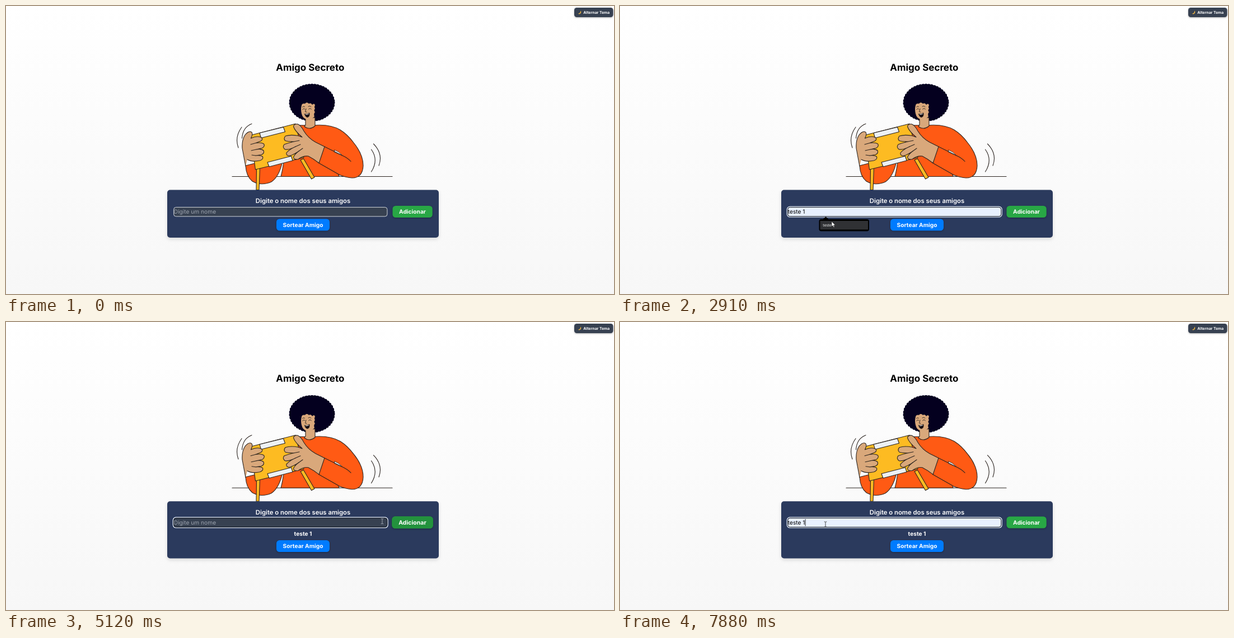
An HTML page that plays this animation: 1086x516 px, repeating every 8000 ms.

```html
<!DOCTYPE html>
<html lang="pt-BR">
<head>
<meta charset="utf-8">
<title>Amigo Secreto</title>
<style>
  html, body { margin: 0; width: 100%; height: 100%; overflow: hidden; background: #fff; }
  svg { display: block; width: 100vw; height: 100vh; }
  text { font: 10.18px Inter, sans-serif; font-optical-sizing: none; text-rendering: geometricPrecision; }
  .mid { text-anchor: middle; }
  .bold { font-weight: 700; fill: #fff; }
  .title { font-size: 16.97px; font-weight: 700; fill: #000; }
  .label { font-size: 11.31px; font-weight: 600; fill: #fff; }
  .tiny { font-size: 6.79px; }
  .tip { font-family: "Open Sans", "Noto Sans", sans-serif; font-size: 6.79px; fill: #fff; }
  .panel { filter: drop-shadow(0 3px 3px rgba(0, 0, 0, .12)); }
  .btn { filter: drop-shadow(0 1.5px 1.5px rgba(0, 0, 0, .3)); }
  .art { stroke: #2b2420; stroke-width: 1.1; stroke-linejoin: round; stroke-linecap: round; }
  .line { fill: none; }
  .skin { fill: #d9a87b; }
  .shirt { fill: #ff5a14; }
  .box { fill: #fdbb22; }
  .tape { fill: #edf1f4; }
  .hair { fill: #04001f; stroke: #04001f; stroke-width: 7; stroke-dasharray: 0 5; }
</style>
</head>
<body>
<svg viewBox="0 0 1086 516" preserveAspectRatio="none">
  <defs>
    <linearGradient id="bg" x2="0" y2="1">
      <stop offset="0" stop-color="#fff"/>
      <stop offset="1" stop-color="#f7f7f7"/>
    </linearGradient>
  </defs>
  <rect width="1086" height="516" fill="url(#bg)"/>

  <g class="btn">
    <rect x="1015" y="3" width="69.5" height="17" rx="4.5" fill="#374151"/>
    <path d="M1026 8.6A3.2 3.2 0 1 1 1021.6 13.4A4 4 0 0 0 1026 8.6Z" fill="#f5b942"/>
    <text class="bold tiny" x="1031.2" y="14">Alternar Tema</text>
  </g>

  <g id="top">
    <text class="title mid" x="543.4" y="115.8">Amigo Secreto</text>
    <g class="art">
      <path class="line" d="M404 305.5H690"/>
      <!-- motion marks -->
      <path class="line" d="M421 217Q408 235 415 254M439 211Q423 217 421.5 237M656.500 247Q674 265 666 286M652.500 257Q666 276 652.500 297"/>
      <!-- head -->
      <ellipse class="hair" cx="546.500" cy="173" rx="37.500" ry="30.300"/>
      <!-- torso and far arm -->
      <path class="shirt" d="M491 305.500Q495 290 496 277L520 213.500Q530 214 536 213.500H553Q580 212 597 222Q610 230 621 245Q638 266 638 286Q637 308 618 308Q606 307 594 302L595 305.500Z"/>
      <path class="skin" d="M535 200V213Q533 215 533 216Q542 223 552 215V200Z"/>
      <path class="skin" stroke="none" d="M528 178Q529 174 534 175Q537 171 541 175Q545 173 547 177Q551 173 552 178Q550 181 552 184Q549 187 552 190Q549 193 551 198Q545 204 538 203Q530 202 528 193Q526 185 528 178Z"/>
      <path class="line" stroke-width=".9" d="M529.500 181Q531 179 533.500 180.500M540 180Q543 178 545 180.500M529.500 185.500Q532 182.500 534 185M540.500 185Q543 182 545.500 185M536 184L534.500 189.500L537 190"/>
      <path fill="#160b10" stroke-width=".7" d="M533.500 193.500Q538 194 542 191.500Q543 199 538 199.500Q534.500 198.500 533.500 193.500Z"/>
      <path stroke="#fff" stroke-width="1" d="M535.500 194.300Q538 194.500 540.500 193.300" fill="none"/>
      <!-- near arm -->
      <path class="shirt" d="M428 286Q429 305 440 314Q456 323 474 315Q488 306 494 278L444 282Z"/>
      <!-- forearm -->
      <path class="tape" stroke-width=".8" d="M587 258Q594 260 601 268L587 262Z"/>
      <path class="line" d="M569 252L601 268Q610 272 616 278.500M559 281.500L594 301.500"/>
      <!-- parcel -->
      <path class="box" d="M447.500 292L453.500 290L452 329.500H447ZM526 276L531.500 273.500L551 307L545.500 310Z"/>
      <path class="box" d="M437 231.500L517 211L532 271.500L445.500 293Z"/>
      <path class="tape" d="M453 227.500L495.500 217L498.500 225.500L455.500 236.500ZM467 280L509.500 269L512 277L470 288Z"/>
      <!-- hands -->
      <path class="skin" d="M428 287L422 255Q421 240 427 231Q433 223.500 438 225.500Q442 228 437.500 237Q448 232 456 235.500Q460 239 455 242L446 245.500Q456 244 460.500 247Q463 251 458 254.500L447 257Q456 255 460 259Q462 264 456 266.500L446 268Q455 267 458.500 270Q460 275 453 277Q440 280 431 275"/>
      <path class="line" d="M446 245.500L437 248M447 257L438 259M446 268L439 267"/>
      <path class="skin" d="M569 252L559 281.500Q550 274 540 269Q530 268 522 274.500Q514 276 513.500 271Q515 266 523 260Q513 267 506 268.500Q500 268 501 263Q506 257 517 252Q506 258 498.500 257Q493 253 497 248Q506 245 514 243Q504 243 499 241.500Q495 238 499 233Q508 230 522 232.500L529 235Q516 224 513.500 216Q514 211 521 211.500Q527 214 532 224Q540 237 553 244Z"/>
      <path class="line" d="M514 243L524 241M517 252L526 248M523 260L530 255"/>
    </g>
  </g>

  <rect id="panel" class="panel" x="288" width="485" rx="5" fill="#2b3a5d"/>
  <text id="label" class="label mid" x="530.5" y="352.8">Digite o nome dos seus amigos</text>

  <g id="row">
    <rect id="ring" x="298.500" y="359.500" width="383.500" height="18.500" rx="5" fill="none" stroke="#eaf3ff" stroke-width="1.500"/>
    <rect id="field" x="299.600" y="360.600" width="381.300" height="16.400" rx="4"/>
    <text id="value" x="299.800" y="372.400"></text>
    <rect id="caret" x="330.600" y="362.500" width=".9" height="12.500" fill="#111"/>
    <g id="add" class="btn">
      <rect x="690.500" y="358" width="71.200" height="21" rx="5.500" fill="#28a745"/>
      <rect id="addHover" x="690.500" y="358" width="71.200" height="21" rx="5.500" fill="#218838"/>
      <text class="bold mid" x="726" y="372.200">Adicionar</text>
    </g>
  </g>

  <text id="item" class="bold mid" x="530.500" y="383">teste 1</text>
  <g id="draw" class="btn">
    <rect x="483" y="381.500" width="95" height="21" rx="5.500" fill="#007bff"/>
    <text class="bold mid" x="530.500" y="395.700">Sortear Amigo</text>
  </g>

  <g id="drop">
    <path d="M361.500 383L367.500 377.500L373.500 383Z"/>
    <rect x="355.500" y="382" width="89.500" height="21.500" rx="4"/>
    <rect id="pick" x="357.500" y="385" width="85.500" height="15.500" fill="#303134"/>
    <text class="tip" x="362.300" y="395.200">teste 1</text>
  </g>

  <circle id="click" r="8.700" fill="#ffee00" fill-opacity=".65"/>
  <g id="cursor" stroke-linejoin="round">
    <path fill="#fff" stroke="#111" stroke-width=".6" d="M0 0V9.300L2.200 7.300L3.700 10.700L5.200 10L3.700 6.800H6.600Z"/>
    <path id="beam" fill="none" stroke-width=".9" d="M-2.300 -4.600H-.6L0 -4L.6 -4.600H2.300M0 -4V4M-2.300 4.600H-.6L0 4L.6 4.600H2.300"/>
    <path fill="#fff" stroke="#222" stroke-width=".6" d="M-1.300 -1Q0 -2.600 1.300 -1V3.400Q2.600 2.800 3.400 4Q4.600 3.600 5.200 4.700Q6.600 4.600 6.600 6V9L5.300 12.600H-.6L-4 7.200Q-3.900 5.600 -2.500 6.200L-1.300 7.400Z"/>
  </g>
</svg>

<script>
const LOOP = 8000, TICK = 70;
const ARROW = 0, BEAM = 1, HAND = 2;
const $ = id => document.getElementById(id);

// time, x, y, shape
const path = [
  [320, 1022, 453, ARROW], [600, 800, 340, ARROW], [810, 640, 287, ARROW], [950, 580, 305, ARROW],
  [1090, 552.5, 350, BEAM], [1220, 552.5, 350, BEAM], [1290, 552, 354, BEAM], [1360, 551, 362, BEAM],
  [1430, 549, 380, ARROW], [1500, 550, 373, BEAM], [2700, 550, 373, BEAM], [2770, 480, 374, BEAM],
  [2840, 410, 384, ARROW], [2910, 378, 386, ARROW], [3470, 378, 386, ARROW], [3540, 400, 376, BEAM],
  [3610, 440, 366, BEAM], [3750, 520, 361, BEAM], [3890, 549, 362, BEAM], [4160, 665, 360, BEAM],
  [4230, 683, 363, ARROW], [4300, 700, 368, HAND], [4510, 717, 368, HAND], [4980, 717, 368, HAND],
  [5050, 700, 360, HAND], [5120, 672, 357, BEAM], [5400, 510, 353.5, BEAM], [5600, 436, 354.5, BEAM],
  [6060, 436, 354.5, BEAM], [6130, 428, 357, BEAM], [6260, 406, 364, BEAM], [6330, 397, 373, ARROW],
  [6470, 378, 381, ARROW], [6870, 378, 381, ARROW], [6940, 371, 368, BEAM], [7070, 367, 362.5, BEAM],
  [LOOP, 367, 362.5, BEAM]
];

const spans = {
  focus: [[1770, 4700], [4840, LOOP]],
  filled: [[2840, 4840], [6470, LOOP]],
  drop: [[2100, 3470], [6130, 6870]],
  pick: [[2840, 3470], [6470, 6870]],
  caret: [[3470, 3980], [4470, 4700], [6870, 7350], [7880, LOOP]],
  click: [[1700, 1840], [3260, 3470], [4700, 4840], [5800, 5870], [6660, 6870]],
  item: [[4840, LOOP]]
};

const active = (name, t) => spans[name].some(([a, b]) => t >= a && t < b);
const show = (el, on) => { el.style.display = on ? "" : "none"; };
const move = (id, y) => $(id).setAttribute("transform", `translate(0 ${y})`);
const clamp = v => Math.max(0, Math.min(1, v));

function cursorAt(t) {
  const i = path.findIndex((p, k) => k + 1 < path.length && t >= p[0] && t < path[k + 1][0]);
  if (i < 0) return null;
  const [t0, x0, y0, shape] = path[i], [t1, x1, y1] = path[i + 1];
  const k = Math.floor((t - t0) / TICK) * TICK / (t1 - t0);
  return { x: x0 + (x1 - x0) * k, y: y0 + (y1 - y0) * k, shape };
}

function drawCursor(t, filled) {
  const c = cursorAt(t);
  show($("cursor"), c);
  show($("click"), c && active("click", t));
  if (!c) return;
  const at = `translate(${c.x} ${c.y})`;
  $("cursor").setAttribute("transform", at);
  $("click").setAttribute("transform", at);
  [...$("cursor").children].forEach((el, i) => show(el, i === c.shape));
  $("beam").setAttribute("stroke", filled ? "#333" : "#aab2be");
}

function render(t) {
  const focus = active("focus", t), filled = active("filled", t), added = active("item", t);

  move("top", added ? -8.3 : 0);
  move("label", added ? -8.2 : 0);
  move("row", added ? -9.4 : 0);
  move("drop", added ? -9.2 : 0);
  move("draw", added ? 9.6 : 0);
  $("panel").setAttribute("y", added ? 321.3 : 329.6);
  $("panel").setAttribute("height", added ? 102.2 : 85.4);

  show($("ring"), focus);
  for (const id of ["drop", "pick", "caret", "item"]) show($(id), active(id, t));
  $("field").setAttribute("fill", filled ? "#e8f0fe" : "#374151");
  $("field").setAttribute("stroke", focus ? "#0b0f17" : "#d1d5db");
  $("value").textContent = filled ? "teste 1" : "Digite um nome";
  $("value").setAttribute("fill", filled ? "#000" : "#9ca3af");

  const hover = clamp((t - 4300) / 200) - clamp((t - 5050) / 200);
  $("addHover").setAttribute("opacity", hover);
  $("add").setAttribute("transform", `translate(726 368.5) scale(${1 + .05 * hover}) translate(-726 -368.5)`);

  drawCursor(t, filled);
}

const start = performance.now();
function frame() {
  render((performance.now() - start) % LOOP);
  requestAnimationFrame(frame);
}
frame();
</script>
</body>
</html>
```
